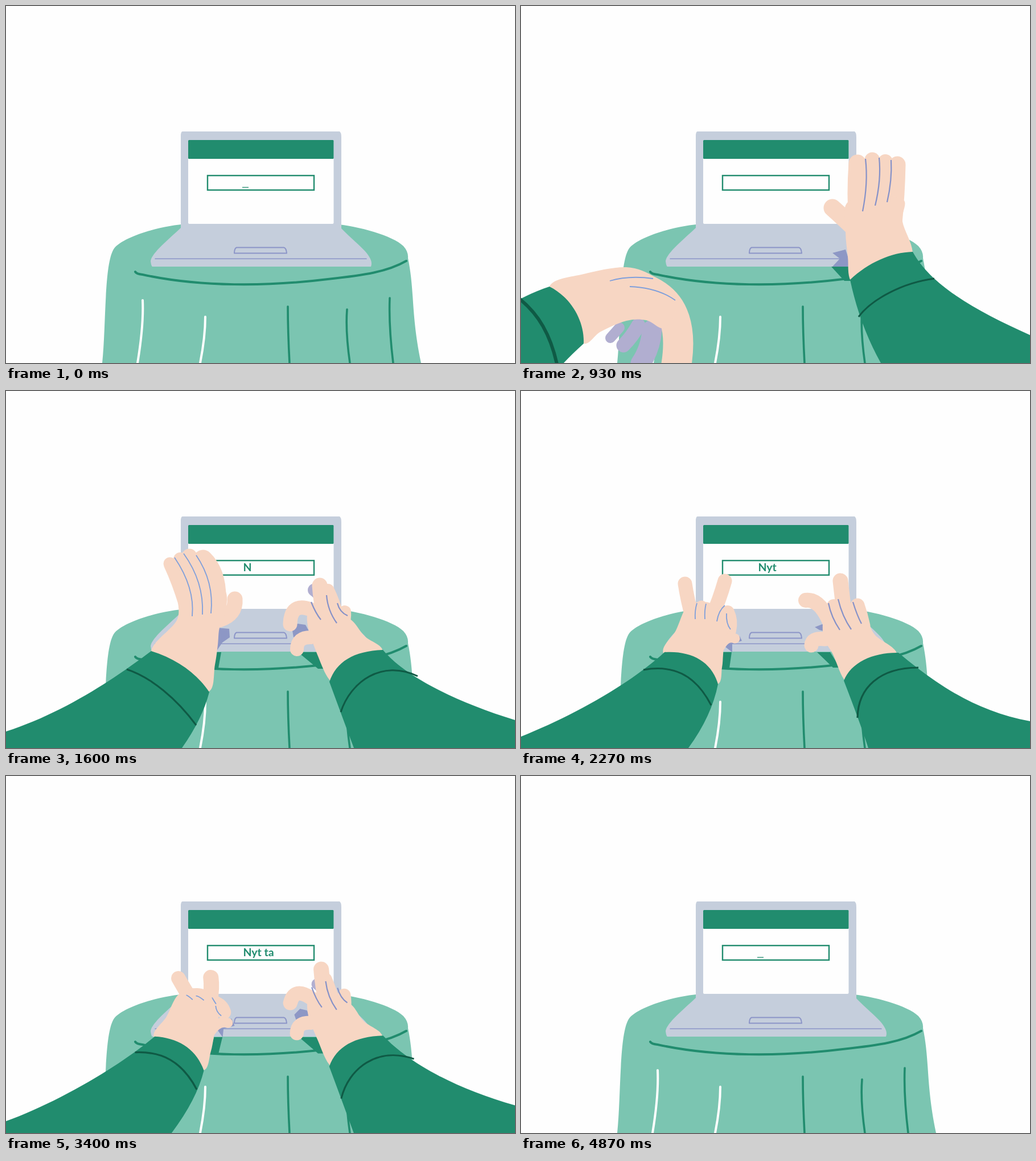
Animation, 894 px wide and 626 px high, one loop 5.14 s. Source, as an HTML page:

```html
<!DOCTYPE html>
<html lang="da">
<head>
<meta charset="utf-8">
<title>Typing at a small table</title>
<style>
  html, body { margin: 0; width: 100%; height: 100%; overflow: hidden; background: #fefefe; }
  svg { display: block; width: 100vw; height: 100vh; }
  text { font: 700 19.5px Lato, "Open Sans", sans-serif; fill: #218c6e; white-space: pre; }
  .line { fill: none; stroke-linecap: round; stroke-linejoin: round; }
</style>
</head>
<body>
<svg viewBox="0 0 894 626">
  <path fill="#7bc5b1" d="M169 626C176 560 172 450 190 425C205 405 270 385 320 382H575C620 386 680 403 698 421Q707 431 706 442C718 500 711 540 729 626Z"/>
  <g class="line" stroke="#218c6e" stroke-width="4">
    <path d="M227 466Q229 470 240 471C340 493 460 492 565 479C630 472 670 466 703 447"/>
    <path d="M495 527Q495 570 498 626M599 532Q596 570 604 626M674 512Q672 560 680 626" stroke-width="3.6"/>
    <path d="M240 516Q242 560 231 626M350 545Q350 580 341 626" stroke="#fefefe"/>
  </g>
  <path fill="#c5cedc" d="M307 390V228Q307 220 310 220H586Q589 222 589 230V390C610 412 636 430 641 446Q643 452 641 457H257Q255 456 254 447C257 432 285 410 307 389Z"/>
  <rect x="320" y="235" width="255.5" height="147" rx="2" fill="#fefefe"/>
  <rect x="320" y="235" width="255.5" height="33" rx="1.5" fill="#218c6e"/>
  <rect x="354" y="297.3" width="187" height="25.4" fill="none" stroke="#218c6e" stroke-width="2.4"/>
  <g class="line" stroke="#8c95c8">
    <path d="M405 423.5H488Q492 424 493 433.5H401Q401 425 405 423.5Z" stroke-width="2"/>
    <path d="M262 443.3H633" stroke-width="1.6"/>
  </g>
  <rect id="cursor" x="415" y="317.3" width="11" height="1.5" fill="#3f9a80"/>
  <text id="typed" x="416.5" y="316" xml:space="preserve"></text>
  <g id="hands"></g>
</svg>
<script>
const LOOP = 5140, FRAME = 200 / 3;
const SKIN = '#f7d6c3', GREEN = '#218c6e', SEAM = '#0f5a45', SHADE = '#8d97c5', FAR = '#b1aed0';
const $ = id => document.getElementById(id);

// Strokes are "path w width"; every pose of one hand shares the same structure.
const rightTail = 'L1200 720L850 1000', leftTail = 'L-300 740L50 1000';

const right = {
  raised: {
    deep: 'M545 457 577 457 580 482 568 482Z',
    shade: 'M547 433 570 427 580 457 547 457 560 443Z',
    far: ['M600 400Q605 405 610 410w10'],
    fingers: ['M591 276Q587 330 591 380w31', 'M547 354Q565 370 588 392w31', 'M617 270Q619 330 615 390w27',
      'M640 273Q641 330 636 390w26', 'M661 278Q660 330 655 380w29'],
    palm: '573 345 625 335 672 340 670 378 688 432 680 490 610 510 579 482 574 440 570 395',
    lines: 'M605 268Q610 310 600 360M629 266Q633 305 622 350M650 270Q652 305 643 344M600 400Q600 400 600 400',
    sleeve: `M578 480C610 450 650 432 688 431C720 490 800 535 894 577${rightTail}L632 626Q595 560 578 480Z`,
    seam: 'M593 545C615 515 670 485 726 478w3'
  },
  curled: {
    deep: 'M513 458 546 458 562 487 548 487Z',
    shade: 'M503 420 512 408 526 410 536 428 505 432Z',
    far: ['M541 349Q545 352 548 355w22'],
    fingers: ['M499 409Q500 370 535 383w25', 'M511 453Q511 431 537 432w24', 'M551 341Q553 370 560 400w27',
      'M565 350Q575 370 582 397w24', 'M595 387Q596 398 592 410w22'],
    palm: '535 385 575 385 607 402 630 430 662 456 640 500 590 520 567 505 548 465 530 412',
    lines: 'M536 370Q544 390 553 401M563 358Q565 385 581 407M582 372Q586 388 600 394M560 430Q560 430 560 430',
    sleeve: `M568 510C580 475 610 456 662 454C700 500 790 545 894 577${rightTail}L611 626Q590 570 568 510Z`,
    seam: 'M588 563C605 510 660 470 723 500w3'
  },
  spread: {
    deep: 'M520 458 543 458 560 485 548 485Z',
    shade: 'M516 414 529 409 536 414 536 422 524 419Z',
    far: ['M560 410Q562 412 565 415w10'],
    fingers: ['M500 367Q526 364 545 412w26', 'M510 446Q511 432 534 435w25', 'M561 333Q564 360 568 392w27',
      'M549 377Q555 400 562 420w24', 'M591 376Q597 393 601 412w25'],
    palm: '536 392 575 380 605 398 622 428 660 460 640 500 590 520 567 505 548 462 531 430',
    lines: 'M540 372Q545 397 560 419M557 365Q564 395 580 418M583 370Q590 393 598 408M560 430Q560 430 560 430',
    sleeve: `M567 508C580 475 620 458 663 459C730 515 800 562 894 579${rightTail}L610 626Q595 580 567 508Z`,
    seam: 'M591 573C592 520 630 485 698 485w3.2'
  },
  pressing: {
    deep: 'M519 458 537 458 548 487 535 487Z',
    shade: 'M493 432 520 429 537 432 541 458 518 456Z',
    far: ['M540 400Q542 402 545 405w10'],
    fingers: ['M497 349Q493 385 492 425w22', 'M518 415Q513 400 527 385w25', 'M513 340Q525 370 537 402w26',
      'M531 339Q541 365 552 400w25', 'M548 338Q562 362 574 392w28'],
    palm: '508 358 558 348 590 382 612 407 633 428 615 470 560 500 546 482 537 450 524 398',
    lines: 'M502 340Q512 365 531 390M522 332Q540 352 549 377M541 332Q557 352 564 377M504 357Q506 378 504 388',
    sleeve: `M545 484C552 445 590 425 632 427C690 478 780 540 894 573${rightTail}L612 626Q575 560 545 484Z`,
    seam: 'M567 536C583 490 625 468 676 461w4'
  }
};

const left = {
  limp: {
    deep: 'M200 520 205 520 205 525 200 525Z',
    shade: 'M200 520 205 520 205 525 200 525 200 523Z',
    far: ['M173 564Q166 572 157 582w18', 'M206 560Q195 580 180 595w25', 'M230 568Q228 600 210 627w35'],
    fingers: ['M200 480Q220 490 235 500w26', 'M190 490Q210 495 235 505w26', 'M180 500Q200 500 230 510w30',
      'M225 500Q292 530 271 640w53', 'M130 510Q150 510 160 520w30'],
    palm: '50 492 110 470 185 458 235 475 268 502 270 540 250 565 220 551 185 552 140 571 110 592 70 560',
    lines: 'M156 482Q190 472 232 478M191 492Q240 494 271 516M200 510Q200 510 200 510M200 510Q200 510 200 510',
    sleeve: `M110 592C112 555 90 512 50 492C35 497 18 504 0 513${leftTail}L75 626Q90 610 110 592Z`,
    seam: 'M-2 514C30 540 52 575 64 632w6'
  },
  raised: {
    deep: 'M368 458 378 458 373 486 362 486Z',
    shade: 'M370 415 392 417 393 432 380 441 369 457Z',
    far: ['M320 410Q322 412 325 415w10', 'M330 420Q332 422 335 425w10', 'M340 420Q342 422 345 425w10'],
    fingers: ['M288 303Q303 335 315 375w23', 'M306 295Q324 335 330 385w24', 'M322 290Q345 325 350 385w27',
      'M346 296Q376 325 367 390w35', 'M402 365Q404 392 375 401w27'],
    palm: '255 458 300 402 303 360 325 345 365 340 386 352 386 385 375 415 372 445 367 480 356 527 300 510',
    lines: 'M296 292Q332 345 327 395M312 285Q348 335 345 392M334 288Q366 335 360 390M340 420Q340 420 340 420',
    sleeve: `M357 528C335 495 300 470 255 456C190 505 100 565 0 597${leftTail}L309 626Q345 575 357 528Z`,
    seam: 'M212 488C255 502 300 540 334 586w3'
  },
  spread: {
    deep: 'M354 458 370 458 366 486 350 486Z',
    shade: 'M354 445 384 430 388 438 371 443 371 458Z',
    far: ['M310 410Q312 412 315 415w10', 'M320 420Q322 422 325 425w10', 'M330 420Q332 422 335 425w10'],
    fingers: ['M288 338Q292 365 302 402w25', 'M317 378Q316 390 317 402w21', 'M358 333Q349 365 335 397w25',
      'M363 388Q370 403 366 420w24', 'M376 434Q361 428 350 448w17'],
    palm: '250 460 272 420 292 378 325 370 347 382 364 395 362 420 357 440 355 462 353 485 345 514 300 500',
    lines: 'M309 372Q305 385 306 400M325 373Q322 385 323 400M358 376Q347 385 344 404M361 390Q360 408 368 418',
    sleeve: `M346 514C335 475 300 455 252 458C190 515 90 570 0 606${leftTail}L294 626Q335 570 346 514Z`,
    seam: 'M215 489C265 480 305 495 334 551w3'
  },
  resting: {
    deep: 'M398 458 409 458 394 487 379 487Z',
    shade: 'M402 420 430 412 440 438 414 442 408 458Z',
    far: ['M340 410Q342 412 345 415w10', 'M350 420Q352 422 355 425w10', 'M360 420Q362 422 365 425w10'],
    fingers: ['M345 402Q365 381 400 380w26', 'M360 402Q385 380 413 384w33', 'M365 412Q400 388 424 392w33',
      'M370 422Q405 395 432 398w25', 'M429 430Q405 427 385 452w18'],
    palm: '287 455 310 428 332 400 360 378 400 374 425 390 412 412 402 425 393 448 378 482 353 522 310 500',
    lines: 'M338 420Q358 382 390 370M358 422Q380 385 418 374M376 428Q400 392 440 388M389 440Q395 430 407 428',
    sleeve: `M352 524C335 495 315 470 287 453C215 500 80 585 0 603${leftTail}L282 626Q335 560 352 524Z`,
    seam: 'M260 472C300 490 320 515 338 546w4.2'
  }
};

// [frame, pose, dx, dy]
const leftKeys = [
  [6, 'limp', -270, 180], [14, 'limp'], [20, 'spread'], [21, 'spread'], [24, 'raised'], [28, 'spread'],
  [30, 'spread'], [32, 'raised'], [34, 'spread'], [38, 'raised'], [41, 'spread'], [43, 'raised'],
  [45, 'spread'], [49, 'spread'], [55, 'resting'], [68, 'resting'], [73, 'resting', -330, 265]
];
const rightKeys = [
  [6, 'raised', 320, 370], [14, 'raised'], [20, 'spread'], [21, 'spread'], [24, 'curled'], [28, 'spread'],
  [30, 'spread'], [32, 'curled'], [34, 'spread'], [41, 'spread'], [43, 'curled'], [45, 'spread'],
  [47, 'curled'], [49, 'curled'], [55, 'spread'], [59, 'pressing'], [60, 'pressing'], [63, 'spread'],
  [68, 'pressing'], [73, 'pressing', 330, 310]
];
const typing = [[0, ''], [20, 'N'], [28, 'Ny'], [32, 'Nyt'], [42, 'Nyt t'], [50, 'Nyt ta'], [54, 'Nyt tag'], [73, '']];
const blink = [[0, 1], [1, .5], [2, 0], [4, .5], [5, 1], [9, .5], [10, 0], [73, 1]];
const held = new Set([3, 6, 10, 13, 17, 21, 25, 29, 33, 37, 40, 44, 48, 52, 56, 60, 64, 67, 71]);

const NUMBER = /-?\d+(\.\d+)?/g;
const lerp = (a, b, k) => a + (b - a) * k;
const latest = (table, n) => table.filter(row => row[0] <= n).pop()[1];

function blend(a, b, k) {
  const ends = b.match(NUMBER);
  let i = 0;
  return a.replace(NUMBER, v => +lerp(+v, +ends[i++], k).toFixed(2));
}

// Closed Catmull-Rom curve through a string of points.
function smooth(text) {
  const v = text.split(' ').map(Number), count = v.length / 2;
  const at = i => { const j = (i + count) % count * 2; return [v[j], v[j + 1]]; };
  let d = 'M' + at(0);
  for (let i = 0; i < count; i++) {
    const [p, q, r, s] = [at(i - 1), at(i), at(i + 1), at(i + 2)];
    d += 'C' + [0, 1].map(c => q[c] + (r[c] - p[c]) / 6) + ',' + [0, 1].map(c => r[c] - (s[c] - q[c]) / 6) + ',' + r;
  }
  return d + 'Z';
}

function add(parent, tag, attrs = {}) {
  const el = document.createElementNS('http://www.w3.org/2000/svg', tag);
  for (const name in attrs) el.setAttribute(name, attrs[name]);
  return parent.appendChild(el);
}

function makeHand(poses, keys, lineColor, lineWidth) {
  const group = add($('hands'), 'g');
  const fill = color => add(group, 'path', { fill: color });
  const stroke = (color, width = 1) => add(group, 'path', { class: 'line', stroke: color, 'stroke-width': width });
  const any = Object.values(poses)[0];
  const deep = fill(GREEN), shade = fill(SHADE);
  const far = any.far.map(() => stroke(FAR));
  const fingers = any.fingers.map(() => stroke(SKIN));
  const palm = fill(SKIN), lines = stroke(lineColor, lineWidth);
  lines.style.strokeLinecap = 'butt';
  const sleeve = fill(GREEN), seam = stroke(SEAM);
  seam.style.strokeLinecap = 'butt';

  const setStroke = (el, text) => {
    const [d, width] = text.split('w');
    el.setAttribute('d', d);
    el.setAttribute('stroke-width', width);
  };

  return n => {
    const visible = n > keys[0][0] && n < keys[keys.length - 1][0];
    group.style.display = visible ? '' : 'none';
    if (!visible) return;
    const i = keys.findIndex(key => key[0] > n);
    const [t0, nameA, ax = 0, ay = 0] = keys[i - 1], [t1, nameB, bx = 0, by = 0] = keys[i];
    const u = (n - t0) / (t1 - t0), k = u * u * (3 - 2 * u);
    const a = poses[nameA], b = poses[nameB];
    const mix = part => blend(a[part], b[part], k);
    group.setAttribute('transform', `translate(${lerp(ax, bx, k)} ${lerp(ay, by, k)})`);
    deep.setAttribute('d', mix('deep'));
    shade.setAttribute('d', mix('shade'));
    palm.setAttribute('d', smooth(mix('palm')));
    lines.setAttribute('d', mix('lines'));
    sleeve.setAttribute('d', mix('sleeve'));
    setStroke(seam, mix('seam'));
    far.forEach((el, j) => setStroke(el, blend(a.far[j], b.far[j], k)));
    fingers.forEach((el, j) => setStroke(el, blend(a.fingers[j], b.fingers[j], k)));
  };
}

const drawLeft = makeHand(left, leftKeys, '#7f9fdb', 1.8);
const drawRight = makeHand(right, rightKeys, '#8591c8', 2.2);
const start = performance.now();
let shown = -1;

function draw(now) {
  const time = Math.max(0, now - start) % LOOP;
  let n = Math.floor((time + 4) / FRAME);
  while (held.has(n)) n--;
  if (n !== shown) {
    shown = n;
    $('typed').textContent = latest(typing, n);
    $('cursor').setAttribute('opacity', latest(blink, n));
    drawLeft(n);
    drawRight(n);
  }
  requestAnimationFrame(draw);
}
draw(start);
</script>
</body>
</html>
```
